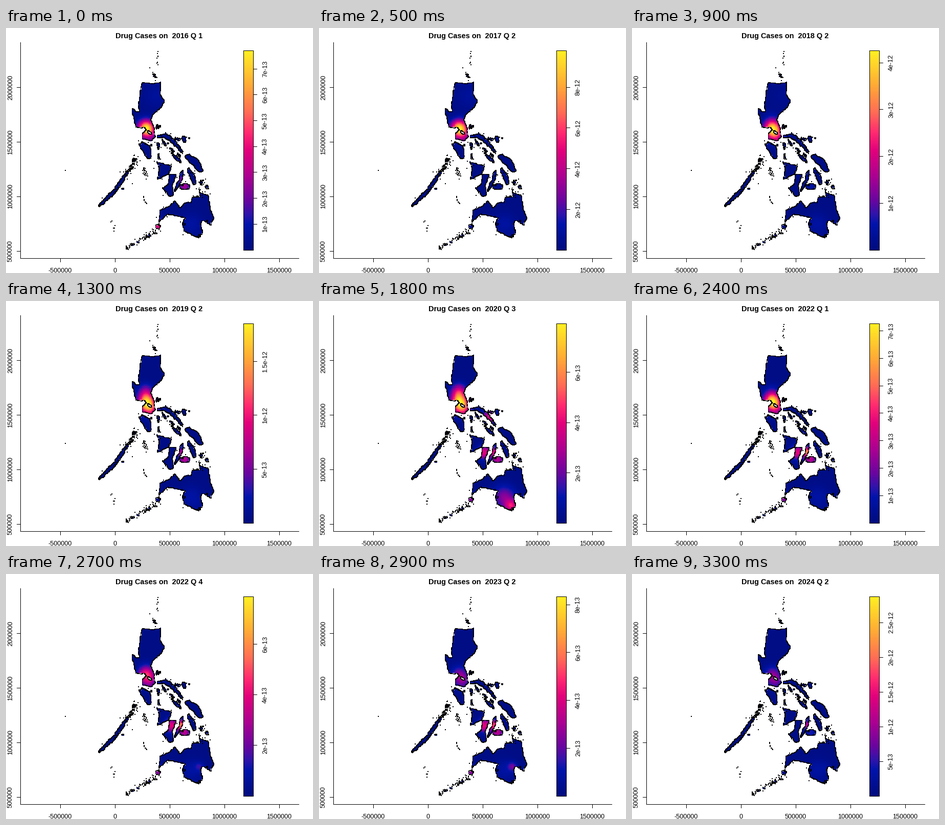
A matplotlib script for the animation above (3.4 s loop, 600 by 480 pixels).

```python
import numpy as np
import matplotlib.pyplot as plt
from matplotlib.animation import FuncAnimation
from matplotlib.collections import LineCollection
from matplotlib.colors import LinearSegmentedColormap
from matplotlib.path import Path

W, H, DPI = 600, 480, 100
PX = 72 / DPI  # points per pixel
FRAMES, INTERVAL = 34, 100
plt.rcParams["font.family"] = "Liberation Sans"
rng = np.random.default_rng(7)

fig = plt.figure(figsize=(W / DPI, H / DPI), dpi=DPI, facecolor="white")
ax = fig.add_axes([0, 0, 1, 1])
ax.axis("off")

cmap = LinearSegmentedColormap.from_list("bmy", [
    (0, "#000c7d"), (.13, "#0014aa"), (.18, "#2e14aa"), (.25, "#6a05a0"),
    (.37, "#ab0092"), (.5, "#e2007c"), (.59, "#ff2a70"), (.69, "#ff6b56"),
    (.83, "#ffab35"), (1, "#fff023")])


# ---- coastlines ----
def project(pts):
    """Longitude and latitude to stage pixels (UTM zone 51)."""
    lon, lat = np.array(pts, float).T
    x = 320 + (lon - 123) * 23.82 * np.cos(np.radians(lat))
    return np.column_stack([x, 544 - 23.67 * lat])


def jag(pts, rough=.9):
    """Closed outline with a rough, pixel-stepped edge."""
    edge = []
    for a, b in zip(pts, np.roll(pts, -1, axis=0)):
        n = max(1, int(np.hypot(*(b - a)) / 2.5))
        edge.append(a + (b - a) * np.arange(n)[:, None] / n)
    ring = np.vstack(edge)
    ring = np.round(ring + rng.uniform(-rough, rough, ring.shape)) + .5
    return np.vstack([ring, ring[:1]])


def strip(width, *spine):
    """Long island: a spine thickened by width pixels and rounded at the ends."""
    pts, s = project(spine), np.linspace(0, 1, 11)
    at = np.linspace(0, 1, len(pts))
    mid = np.column_stack([np.interp(s, at, c) for c in pts.T])
    d = np.gradient(mid, axis=0)
    normal = np.column_stack([-d[:, 1], d[:, 0]]) / np.hypot(*d.T)[:, None]
    half = normal * (width / 2 * np.sin(np.pi * (.06 + .88 * s)) ** .5)[:, None]
    return jag(np.vstack([mid + half, (mid - half)[::-1]]))


def islet(x, y):
    t = np.arange(6) * np.pi / 3
    r = rng.uniform(.8, 2.6, 2)
    return jag(np.column_stack([x + r[0] * np.cos(t), y + r[1] * np.sin(t)]), .7)


luzon = [(120.6, 18.5), (121.6, 18.4), (122.2, 18.5), (122.15, 17.6), (122.5, 17.0),
         (122.3, 16.5), (121.5, 15.8), (121.4, 15.4), (121.65, 14.7), (121.75, 14.0),
         (121.4, 13.65), (120.65, 13.85), (120.65, 14.25), (121.0, 14.6), (120.85, 14.78),
         (120.5, 14.7), (120.1, 14.85), (119.8, 15.9), (119.8, 16.35), (120.1, 16.05),
         (120.35, 16.1), (120.3, 16.6), (120.4, 17.5)]
mindanao = [(125.4, 9.8), (125.5, 9.4), (126.2, 9.1), (126.35, 8.0), (126.6, 7.3),
            (126.4, 6.7), (125.7, 7.1), (125.5, 6.8), (125.7, 6.1), (125.4, 5.6),
            (124.2, 6.2), (124.0, 6.8), (124.25, 7.3), (123.4, 7.5), (122.8, 7.6),
            (122.1, 6.95), (122.15, 7.9), (123.0, 8.3), (123.4, 8.7), (123.8, 8.1),
            (124.3, 8.55), (124.75, 8.55), (124.85, 9.0), (125.5, 9.0)]
panay = [(121.9, 11.9), (123.1, 11.6), (122.95, 11.0), (121.95, 10.45), (122.1, 11.3)]
negros = [(122.95, 10.9), (123.55, 10.9), (123.2, 10.0), (123.3, 9.2), (123.0, 9.05),
          (122.4, 9.75), (122.85, 10.1)]

coasts = [jag(project(p)) for p in (luzon, mindanao, panay, negros)]
coasts += [
    strip(8, (121.9, 14.0), (122.6, 14.1), (123.3, 13.6), (124.05, 12.7)),  # Bicol
    strip(4, (122.3, 13.8), (122.65, 13.25)),                 # Bondoc
    strip(4, (123.4, 13.85), (123.95, 13.75)),                # Caramoan
    strip(7, (124.15, 14.05), (124.25, 13.55)),               # Catanduanes
    strip(16, (120.5, 13.45), (121.05, 13.0), (121.25, 12.2)),  # Mindoro
    strip(14, (124.35, 12.45), (125.1, 11.9), (125.65, 11.1)),  # Samar
    strip(9, (124.5, 11.35), (124.85, 10.8), (125.05, 10.05)),  # Leyte
    strip(6, (124.05, 11.2), (123.85, 10.4), (123.4, 9.5)),   # Cebu
    strip(12, (123.8, 9.85), (124.65, 9.9)),                  # Bohol
    strip(6, (123.25, 12.5), (123.95, 11.9)),                 # Masbate
    strip(3, (122.95, 13.1), (123.35, 12.75)),                # Burias
    strip(3, (123.6, 12.65), (123.85, 12.35)),                # Ticao
    strip(3, (122.05, 12.6), (122.05, 12.1)),                 # Tablas
    strip(5, (121.95, 13.5), (122.05, 13.2)),                 # Marinduque
    strip(4, (121.9, 15.0), (122.0, 14.65)),                  # Polillo
    strip(4, (125.6, 10.4), (125.6, 10.0)),                   # Dinagat
    strip(5, (126.05, 10.0), (126.1, 9.7)),                   # Siargao
    strip(8, (121.8, 6.6), (122.2, 6.55)),                    # Basilan
    strip(7, (117.1, 8.25), (118.4, 9.5), (119.6, 11.3))]     # Palawan
lakes = [strip(5, (121.1, 14.45), (121.45, 14.25))]


def near_coast(n, spread):
    """Points scattered off the central and southern shores."""
    shore = np.vstack(coasts[1:])
    return shore[rng.integers(len(shore), size=n)] + rng.normal(0, spread, (n, 2))


def trail(start, end, spread, n):
    """Points strewn along a line."""
    s = rng.uniform(0, 1, (n, 1))
    return np.array(start) * (1 - s) + np.array(end) * s + rng.normal(0, spread, (n, 2))


dots = np.vstack([
    near_coast(110, 4),
    trail((297, 45), (296, 72), .8, 8),        # Batanes
    trail((282, 84), (297, 100), 3, 10),       # Babuyan
    trail((232, 432), (300, 393), 3, 50),      # Sulu
    trail((236, 284), (256, 254), 4, 50),      # Calamian
    trail((269, 272), (273, 290), 3, 24),      # Cuyo
    trail((265, 325), (276, 349), 1, 8),
    trail((205, 375), (212, 399), 2, 7),
    [(116, 279), (247, 305)]])
for x, y in np.vstack([trail((232, 432), (292, 400), 1.5, 13), trail((240, 276), (256, 252), 3, 9),
                       trail((282, 86), (294, 95), 3, 4), near_coast(16, 4)]):
    coasts.append(islet(x, y))

ax.scatter(*np.round(dots).T, s=(1.6 * PX) ** 2, c="black", marker="s", lw=0,
           antialiased=False, zorder=3)


# ---- intensity surface ----
X0, X1, Y0, Y1, N = 115, 405, 44, 436, 128
gx, gy = np.meshgrid(X0 + (np.arange(N) + .5) * (X1 - X0) / N,
                     Y0 + (np.arange(N) + .5) * (Y1 - Y0) / N)
cells = np.column_stack([gx.ravel(), gy.ravel()])


def inside(rings):
    return np.any([Path(r).contains_points(cells) for r in rings], axis=0).reshape(N, N)


sea = ~inside(coasts) | inside(lakes)


def ramp(t, a, b):
    return np.clip((t - a) / (b - a), 0, 1)


def pulse(t, mid, width):
    return np.exp(-((t - mid) / width) ** 2 / 2)


def spot(x, y, r):
    return np.exp(-((gx - x) ** 2 + (gy - y) ** 2) / (2 * r * r))


# each hot spot on the map and its strength over time, in quarters
HOT = [
    (spot(274, 196, 11), lambda t: .9 - .2 * pulse(t, 15, 5) - .68 * ramp(t, 24, 29)),  # Manila
    (spot(280, 210, 11), lambda t: .2 + .4 * pulse(t, 15, 6)),                  # Laguna
    (spot(273, 177, 10), lambda t: .42 * pulse(t, 17, 4)),                      # Pampanga
    (spot(293, 132, 18), lambda t: .06 * (1 - ramp(t, 5, 13))),                 # Cagayan
    (spot(333, 227, 9), lambda t: .45 * pulse(t, 18, 2)),                       # Bicol
    (spot(323, 297, 9), lambda t: .48 * ramp(t, 14, 18) * (1 - ramp(t, 29, 33))),  # Negros
    (spot(342, 295, 6), lambda t: .2 * pulse(t, 0, 2) + .3 * ramp(t, 8, 13)
     + .35 * pulse(t, 25, 4)),                                                  # Cebu
    (spot(349, 311, 8), lambda t: .33 * pulse(t, 0, 2)
     + .37 * ramp(t, 8, 13) * (1 - ramp(t, 29, 35))),                           # Bohol
    (spot(298, 387, 9), lambda t: .5 * pulse(t, 0, 2)
     + .3 * ramp(t, 14, 18) * (1 - ramp(t, 29, 33))),                           # Zamboanga
    (spot(362, 384, 15), lambda t: .08 + .2 * pulse(t, 18, 2)),                 # Cotabato
    (spot(376, 402, 9), lambda t: .45 * pulse(t, 18, 2)),                       # Sarangani
    (spot(378, 377, 6), lambda t: .22 * pulse(t, 29, 2)),                       # Davao
    (spot(235, 433, 4), lambda t: ramp(t, 24, 29)),                             # Tawi-Tawi
]


def surface(t):
    return np.ma.array(.025 + sum(shape * level(t) for shape, level in HOT), mask=sea)


def scale_top(t):
    """Top of the colour scale, eased between a few turning points."""
    at = [0, 5, 13, 18, 24, 29, 33]
    top = [.771, 9.81, 1.853, .794, .727, .8345, 2.875]
    return 1e-12 * np.exp(np.interp(t, at, np.log(top)))


def pretty_step(top):
    base = 10.0 ** np.floor(np.log10(top))
    m = top / base
    return base * (.2 if m < 1.56 else .5 if m < 3.9 else 1 if m < 7.8 else 2)


# ---- axes, colour scale and text ----
def lines(segs, **kw):
    return ax.add_collection(LineCollection(segs, colors="black", linewidths=PX,
                                            antialiased=False, **kw))


def label(x, y, s, px=12.6, **kw):
    return ax.text(x, y, s, fontsize=px * PX, ha="center", va="baseline",
                   rotation_mode="anchor", **kw)


def picture(data, box, **kw):
    return ax.imshow(data, cmap=cmap, extent=box, aspect="auto",
                     interpolation="nearest", zorder=1, **kw)


img = picture(surface(0), (X0, X1, Y1, Y0), vmin=0, vmax=1)
picture(np.linspace(1, 0, 256)[:, None], (464, 484, 436, 44))
lines(coasts + lakes, zorder=2)

# whole numbers here: rectilinear lines snap to the pixel they name
frame = [[(464, 44), (483, 44), (483, 435), (464, 435), (464, 44)],
         [(28, 28), (28, 451)], [(28, 451), (572, 451)]]
for k in range(5):
    x = 106 + 107 * k
    frame.append([(x, 451), (x, 458)])
    label(x, 479, str(500000 * (k - 1)))
for k in range(4):
    y = 437 - 107 * k
    frame.append([(21, y), (28, y)])
    label(12, y, str(500000 * (k + 1)), rotation=90)
lines(frame, zorder=4)

title = label(299, 20, "", 14.5, weight="bold")
ticks = lines([])
tick_labels = [label(510, 0, "", rotation=90) for _ in range(10)]
ax.set_xlim(0, W)
ax.set_ylim(H, 0)


def draw(i):
    title.set_text(f"Drug Cases on  {2016 + i // 4} Q {i % 4 + 1}")
    img.set_data(surface(i))
    top = scale_top(i)
    step = pretty_step(top)
    segs = []
    for k, text in enumerate(tick_labels, 1):
        y = 435 - 391 * k * step / top
        shown = k * step <= top
        text.set_visible(shown)
        if shown:
            text.set_text(f"{k * step:.3g}")
            text.set_y(y)
            segs.append([(484, int(y)), (490, int(y))])
    ticks.set_segments(segs)
    return []


anim = FuncAnimation(fig, draw, frames=FRAMES, interval=INTERVAL, repeat=True, repeat_delay=0)
plt.show()
```
